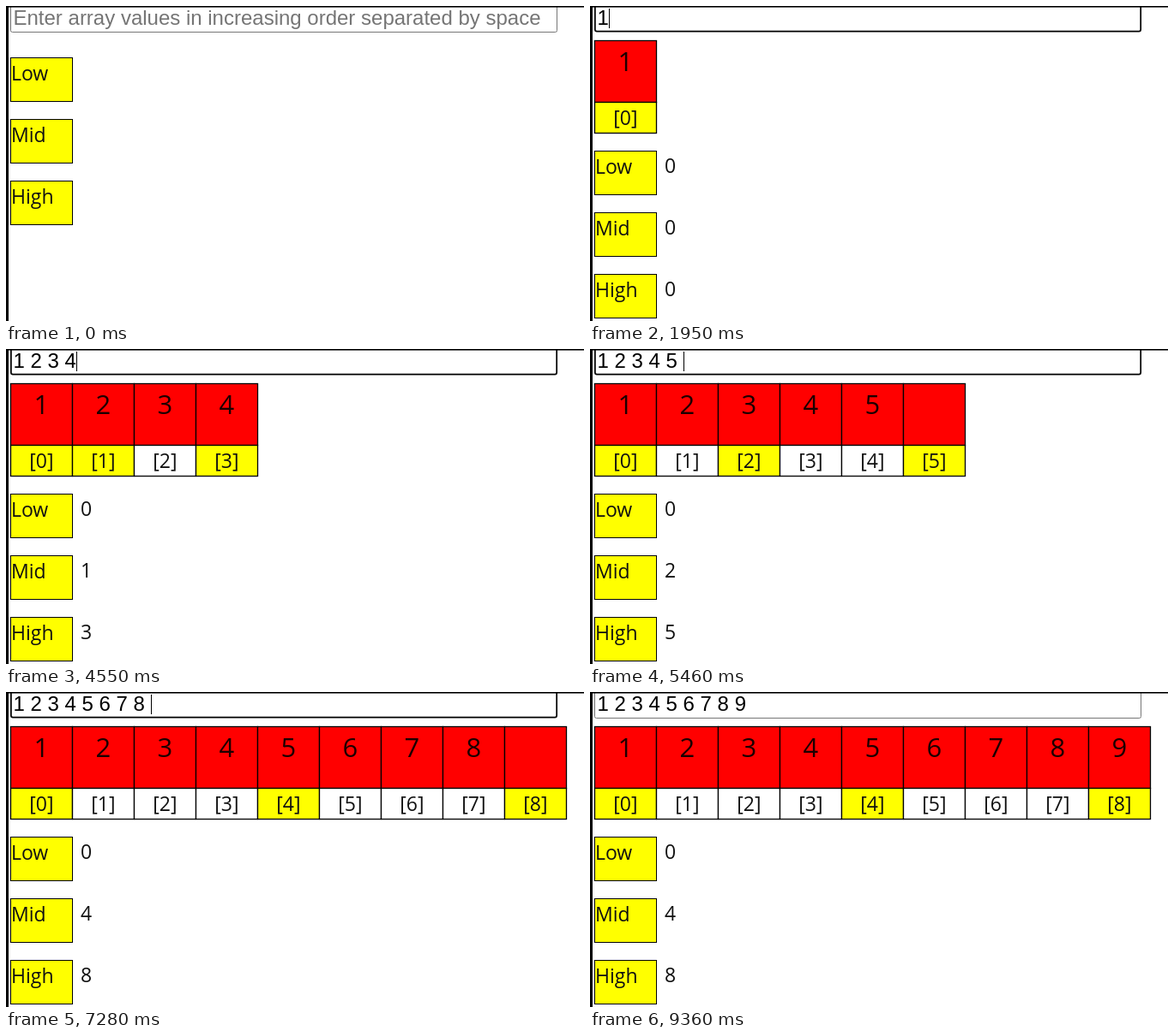
An HTML page with a canvas for the animation above (9.49 s loop, 674 by 368 pixels).

```html
<!DOCTYPE html>
<html lang="en">
<head>
<meta charset="utf-8">
<title>Binary search input</title>
<style>
  html, body { margin: 0; width: 100%; height: 100%; overflow: hidden; background: #fff; }
  canvas { display: block; }
</style>
</head>
<body>
<canvas id="stage" width="674" height="368"></canvas>
<script>
const ctx = document.getElementById('stage').getContext('2d');

const LOOP = 9490, TICK = 130, BLINK = 530;
const FOCUS = 1690, BLUR = 9360;
const TYPED = '1 2 3 4 5 6 7 8 9';
const KEY_TIMES = [1950, 2730, 3120, 3770, 4030, 4420, 4550, 4940, 5070,
                   5460, 5720, 6110, 6370, 6630, 6890, 7280, 7540];
const PLACEHOLDER = 'Enter array values in increasing order separated by space';

const LEFT = 5, CELL = 72, INPUT_TEXT_X = 8.5;
const INPUT_FONT = '24px "Liberation Sans", Arial, sans-serif';
const LABEL_FONT = '23px "Open Sans", "Noto Sans", sans-serif';
const VALUE_FONT = '31px "Open Sans", "Noto Sans", sans-serif';

function text(string, x, y, font, color = '#111', align = 'left') {
  ctx.font = font;
  ctx.fillStyle = color;
  ctx.textAlign = align;
  ctx.fillText(string, x, y);
}

function box(x, y, w, h, fill, lineWidth = 1) {
  ctx.fillStyle = fill;
  ctx.fillRect(x + 0.5, y + 0.5, w, h);
  ctx.strokeStyle = '#000';
  ctx.lineWidth = lineWidth;
  ctx.strokeRect(x + 0.5, y + 0.5, w, h);
}

function drawInput(value, focused, caretOn) {
  ctx.strokeStyle = focused ? '#000' : '#767676';
  ctx.lineWidth = focused ? 1.7 : 1;
  ctx.beginPath();
  ctx.roundRect(focused ? 5.9 : 5.5, -8, focused ? 636.3 : 637, focused ? 37.6 : 38.5, 2);
  ctx.stroke();

  text(value || PLACEHOLDER, INPUT_TEXT_X, 22, INPUT_FONT, value ? '#000' : '#757575');
  if (caretOn) {
    const x = Math.round(INPUT_TEXT_X + (value ? ctx.measureText(value).width : 0));
    ctx.fillStyle = '#000';
    ctx.fillRect(x, 3, 1, 23);
  }
}

function drawArray(items, marked) {
  items.forEach((item, i) => {
    const x = LEFT + i * CELL, center = x + CELL / 2 + 0.3;
    box(x, 40, CELL, 72, '#f00', 1.3);
    box(x, 112, CELL, 36, marked.includes(i) ? '#ff0' : '#fff', 1.3);
    text(item, center, 76, VALUE_FONT, '#1c0000', 'center');
    text(`[${i}]`, center, 139, LABEL_FONT, '#111', 'center');
  });
}

function drawPointers(top, values) {
  ['Low', 'Mid', 'High'].forEach((label, i) => {
    const y = top + i * CELL;
    box(LEFT, y, CELL, 51, '#ff0');
    text(label, 6, y + 27, LABEL_FONT);
    text(values[i] ?? '', 87, y + 26, LABEL_FONT);
  });
}

function draw(now) {
  const time = Math.floor((now % LOOP) / TICK) * TICK;
  const pressed = KEY_TIMES.filter(t => t <= time);
  const value = TYPED.slice(0, pressed.length);
  const items = value ? value.split(' ') : [];
  const high = items.length - 1;
  const pointers = items.length ? [0, high >> 1, high] : [];

  // The caret restarts its blink on every key press, shortly before the tick that shows it.
  const focused = time >= FOCUS && time < BLUR;
  const sinceKey = time - (pressed.at(-1) ?? FOCUS) + 25;
  const caretOn = focused && Math.floor(sinceKey / BLINK) % 2 === 0;

  ctx.fillStyle = '#fff';
  ctx.fillRect(0, 0, 674, 368);
  drawInput(value, focused, caretOn);
  drawArray(items, pointers);
  drawPointers(items.length ? 169 : 60, pointers);

  ctx.fillStyle = '#000';
  ctx.fillRect(0, 0, 674, 1.6);
  ctx.fillRect(0, 0, 3, 368);
}

const start = performance.now();
function frame() {
  draw(performance.now() - start);
  requestAnimationFrame(frame);
}
frame();
</script>
</body>
</html>
```
